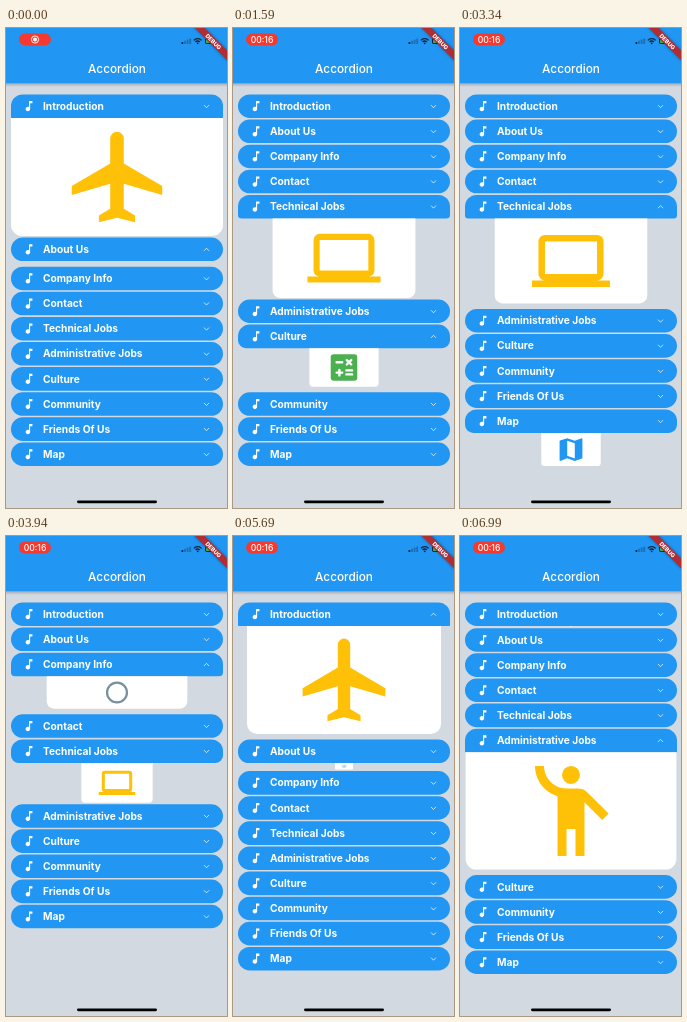
Write an HTML page with a canvas that moves like this. It is 221 by 480 pixels and loops after 7.04 s.

```html
<!DOCTYPE html>
<html lang="en">
<head>
<meta charset="utf-8">
<title>Accordion</title>
<style>
  html, body { margin: 0; width: 100%; height: 100%; overflow: hidden; background: #d3d9e0; }
  canvas { display: block; width: 221px; height: 480px; }
</style>
</head>
<body>
<canvas id="stage"></canvas>
<script>
const W = 221, H = 480, LOOP = 7040, CENTER = 111;
const BLUE = '#2196f3', AMBER = '#ffc107', WHITE = '#fff';
const ROW = { left: 5, top: 66.4, width: 212, height: 23.6, pitch: 25.12, radius: 11.8 };
const OPEN_GAP = 4;

// Icons live on a 24 x 24 grid.
const icons = {
  note: 'M12 3v10.55c-.59-.34-1.27-.55-2-.55-2.21 0-4 1.79-4 4s1.79 4 4 4 4-1.79 4-4V7h4V3z',
  plane: 'M22 16v-2l-8.5-5V3.5a1.5 1.5 0 0 0-3 0V9L2 14v2l8.5-2.5V19L8 20.5V22l4-1 4 1v-1.5L13.5 19v-5.5z',
  seat: 'M22 11v2H9V7h9a4 4 0 0 1 4 4zM2 14v2h6v2h8v-2h6v-2zM8 10a3 3 0 1 1-6 0 3 3 0 0 1 6 0z',
  ring: 'M12 2a10 10 0 1 0 0 20 10 10 0 0 0 0-20zm0 18a8 8 0 1 1 0-16 8 8 0 0 1 0 16z',
  laptop: 'M20 18a2 2 0 0 0 2-2V6a2 2 0 0 0-2-2H4a2 2 0 0 0-2 2v10a2 2 0 0 0 2 2H0v2h24v-2zM4 6h16v10H4z',
  person: 'M14 4a2 2 0 1 1-4 0 2 2 0 0 1 4 0zM15.89 8.11C15.5 7.72 14.83 7 13.53 7h-2.54C8.24 7 6 4.75 6 2H4c0 3.16 2.11 5.84 5 6.71V22h2v-6h2v6h2V10.05L18.95 14l1.41-1.41z',
  tile: 'M5 3h14a2 2 0 0 1 2 2v14a2 2 0 0 1-2 2H5a2 2 0 0 1-2-2V5a2 2 0 0 1 2-2z',
  map: 'M20.5 3L15 5.1 9 3 3.36 4.9Q3 5 3 5.38V20.5q0 .5.5.5L9 18.9l6 2.1 5.64-1.9q.36-.1.36-.48V3.5q0-.5-.5-.5zM15 19l-6-2.11V5l6 2.11z'
};
for (const name in icons) icons[name] = new Path2D(icons[name]);
const mathSigns = new Path2D(
  'M7 8.5h3.8M13.9 7l3 3m0-3l-3 3M7 15.5h3.8M8.9 13.6v3.8M13.6 14h3.9M13.6 16.7h3.9');

const section = (title, icon, color, height = 118, size = 108.5) =>
  ({ title, icon, color, height, size });
const sections = [
  section('Introduction', 'plane', AMBER),
  section('About Us', 'seat', '#90caf9', 76, 65),
  section('Company Info', 'ring', '#78909c', 49, 40),
  section('Contact'),
  section('Technical Jobs', 'laptop', AMBER),
  section('Administrative Jobs', 'person', AMBER),
  section('Culture', 'tile', '#4caf50'),
  section('Community'),
  section('Friends Of Us'),
  section('Map', 'map', BLUE)
];

// Each tap opens one section and closes the one opened before it.
const taps = [
  { at: -LOOP, open: 0 }, { at: 0, open: 1 }, { at: 730, open: 4 },
  { at: 1500, open: 6 }, { at: 2300, open: 9 }, { at: 3145, open: 4 },
  { at: 3765, open: 2 }, { at: 4378, open: 1 }, { at: 5375, open: 0 },
  { at: 6430, open: 5 }
];
const CLOCK_AT = 1590;

const canvas = document.getElementById('stage');
const ctx = canvas.getContext('2d');
const ratio = window.devicePixelRatio || 1;
canvas.width = W * ratio;
canvas.height = H * ratio;

// Critically damped spring from 0 to 1.
function spring(ms) {
  const x = 0.013 * ms;
  return 1 - (1 + x) * Math.exp(-x);
}

function box(x, y, w, h, radius, color) {
  ctx.beginPath();
  ctx.roundRect(x, y, w, h, radius);
  ctx.fillStyle = color;
  ctx.fill();
}

function disc(x, y, r, color) {
  box(x - r, y - r, 2 * r, 2 * r, r, color);
}

function label(text, x, y, size, weight, align = 'left') {
  ctx.font = `${weight} ${size}px Inter, Roboto, sans-serif`;
  ctx.textAlign = align;
  ctx.fillStyle = WHITE;
  ctx.fillText(text, x, y);
}

function drawIcon(name, x, y, size, color) {
  ctx.save();
  ctx.translate(x, y);
  ctx.scale(size / 24, size / 24);
  ctx.translate(-12, -12);
  ctx.fillStyle = color;
  ctx.fill(icons[name], 'evenodd');
  if (name === 'tile') {
    ctx.strokeStyle = WHITE;
    ctx.lineWidth = 1.6;
    ctx.lineCap = 'round';
    ctx.stroke(mathSigns);
  }
  ctx.restore();
}

function drawChevron(x, y, up) {
  const d = up ? -1.3 : 1.3;
  ctx.beginPath();
  ctx.moveTo(x - 2.5, y - d);
  ctx.lineTo(x, y + d);
  ctx.lineTo(x + 2.5, y - d);
  ctx.strokeStyle = 'rgba(255,255,255,.8)';
  ctx.lineWidth = 0.9;
  ctx.stroke();
}

function drawSection(item, top, amount, isOpen) {
  const { left, width, height, radius } = ROW;
  const bottomRadius = radius * (1 - amount);
  const middle = top + height / 2;
  box(left, top, width, height, [radius, radius, bottomRadius, bottomRadius], BLUE);
  drawIcon('note', 23, middle, 13.6, WHITE);
  label(item.title, 37, middle + 3.6, 10.2, 700);
  drawChevron(200.5, middle + 0.2, isOpen);

  if (amount > 0.004 && item.icon) {
    const w = width * amount, h = item.height * amount, r = 11 * amount;
    const y = top + height;
    box(CENTER - w / 2, y, w, h, [0, 0, r, r], WHITE);
    drawIcon(item.icon, CENTER, y + h / 2, item.size * amount, item.color);
  }
}

function drawAccordion(t) {
  const index = taps.findLastIndex(tap => tap.at <= t);
  const current = taps[index], previous = taps[index - 1];
  const progress = spring(t - current.at);
  let top = ROW.top;
  sections.forEach((item, i) => {
    const isOpen = i === current.open;
    const isClosing = previous && i === previous.open;
    const amount = isOpen ? progress : isClosing ? 1 - progress : 0;
    drawSection(item, top, amount, isOpen);
    top += ROW.pitch + item.height * amount + (isOpen ? OPEN_GAP : 0);
  });
}

function drawStatus(t) {
  box(13, 5.5, 32, 12, 6, '#f43a30');
  if (t < CLOCK_AT) {
    ctx.beginPath();
    ctx.arc(29, 11.5, 3.6, 0, 7);
    ctx.strokeStyle = WHITE;
    ctx.lineWidth = 0.9;
    ctx.stroke();
    disc(29, 11.5, 2, WHITE);
  } else {
    label('00:16', 29, 14.6, 8.6, 500, 'center');
  }

  const ink = '#0b2540';
  for (let i = 0; i < 4; i++) {
    const h = 2 + i * 1.2;
    box(175.5 + i * 2.6, 16 - h, 1.8, h, 0.5, i ? 'rgba(11,37,64,.35)' : ink);
  }
  ctx.strokeStyle = ink;
  ctx.lineWidth = 1.3;
  for (const r of [2.8, 5.2]) {
    ctx.beginPath();
    ctx.arc(191.7, 15.8, r, -Math.PI * 0.77, -Math.PI * 0.23);
    ctx.stroke();
  }
  disc(191.7, 15.3, 0.9, ink);
  box(199, 10.3, 10, 5.6, 1.6, ink);
  box(200, 11.2, 4, 3.8, 0.8, '#34c759');
}

function drawRibbon() {
  ctx.save();
  ctx.translate(W, 0);
  ctx.rotate(Math.PI / 4);
  ctx.shadowColor = 'rgba(0,0,0,.45)';
  ctx.shadowBlur = 3 * ratio;
  box(-24, 15.9, 48, 6.8, 0, '#b22c34');
  ctx.shadowColor = 'transparent';
  label('DEBUG', 0, 21.4, 5.7, 800, 'center');
  ctx.restore();
}

function drawAppBar(t) {
  const shade = ctx.createLinearGradient(0, 55, 0, 59);
  shade.addColorStop(0, 'rgba(40,60,85,.3)');
  shade.addColorStop(1, 'rgba(40,60,85,0)');
  box(0, 55, W, 4, 0, shade);
  box(0, 0, W, 55.3, 0, BLUE);
  label('Accordion', CENTER, 45, 11.8, 500, 'center');
  drawStatus(t);
  drawRibbon();
}

function draw(now) {
  const ms = now % LOOP;
  // The picture advances in 50 ms steps after a first step of 40 ms.
  const t = ms < 40 ? 0 : 40 + 50 * Math.floor((ms - 40) / 50);
  ctx.setTransform(ratio, 0, 0, ratio, 0, 0);
  box(0, 0, W, H, 0, '#d3d9e0');
  drawAccordion(t);
  drawAppBar(t);
  box(71, 472.4, 80, 2.8, 1.4, '#000');
}

const start = performance.now();
function tick() {
  draw(performance.now() - start);
  requestAnimationFrame(tick);
}
tick();
</script>
</body>
</html>
```
